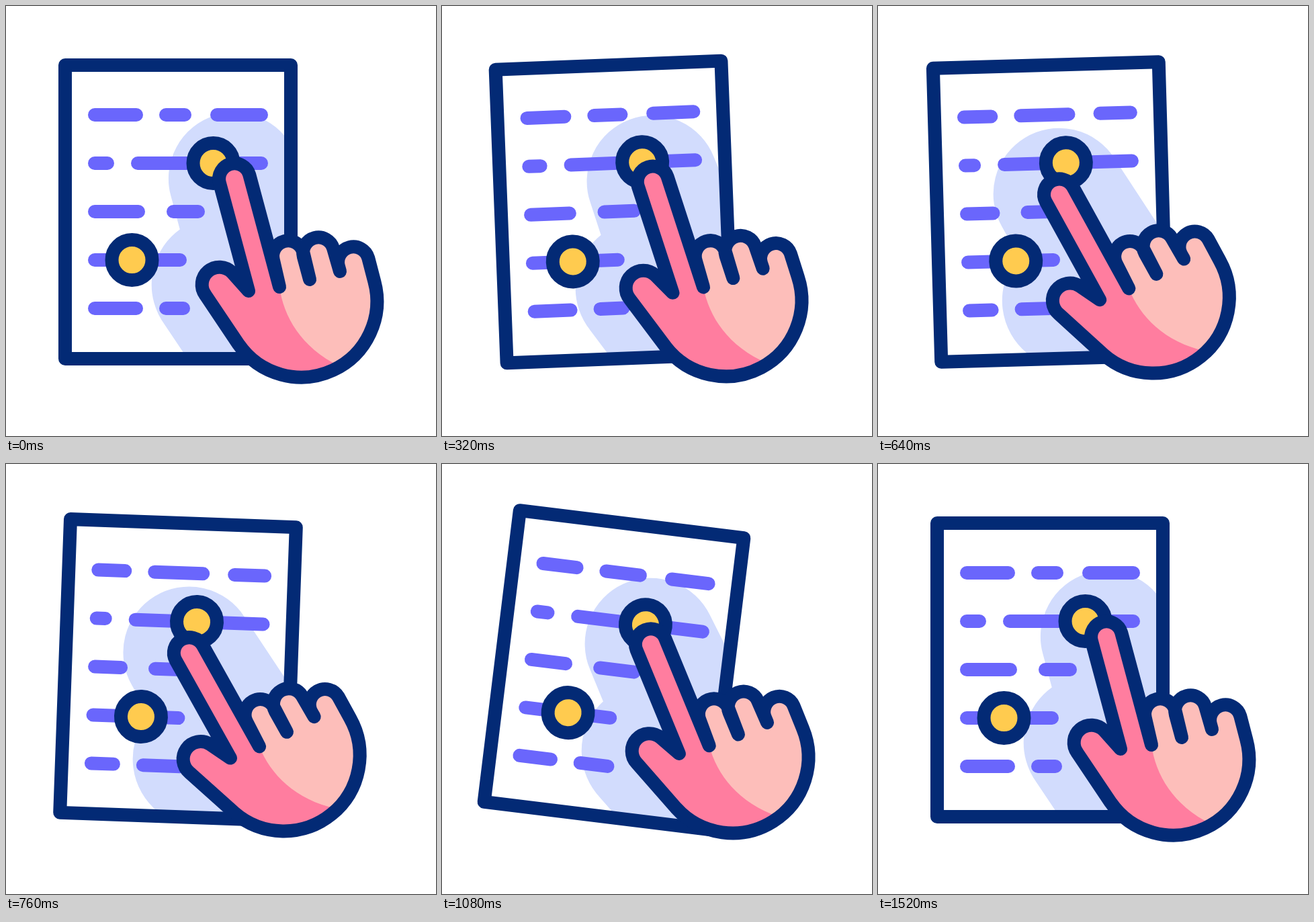
Recreate the animation shown at these times as an HTML page with a canvas. Size 640 by 640 pixels, loop 2 s.

```html
<!DOCTYPE html>
<html lang="en">
<head>
<meta charset="utf-8">
<title>Hand adjusting a page</title>
<style>
html, body { margin: 0; height: 100%; overflow: hidden; background: #fff; }
canvas { display: block; width: 640px; height: 640px; }
</style>
</head>
<body>
<canvas id="stage" width="640" height="640"></canvas>
<script>
const ctx = document.getElementById('stage').getContext('2d');
const NAVY = '#032a75', VIOLET = '#6a66fc', BLUE = '#d2dcfd';
const PINK = '#ff7d9f', PEACH = '#fdbeba', YELLOW = '#ffcb4f';
const LOOP = 2000, STEP = 40;
const PAGE = { x: 88, y: 88, w: 336, h: 437, cx: 256, cy: 306.5 };
const PALM = { x: 439, y: 439 };

// Hand outline, built from the thumb and index finger plus the folded fingers
const pointing = 'L296.7 430A26 26 0 0 1 336.4 396.6L361 424L317.8 263';
const index = pointing + 'A23 23 0 0 1 362.2 251L407 418';
const folded = 'L397.8 378A23 23 0 0 1 442.2 366L452 407L442.8 373' +
  'A23 23 0 0 1 487.2 361L497 395L494.8 387A23 23 0 0 1 539.2 375L548.3 410';
const hand = new Path2D('M346.3 503.8' + index + folded + 'A113 113 0 0 1 346.3 503.8Z');
const shade = new Path2D('M407 418C413 462 439 508 496 536A113 113 0 0 1 346.3 503.8' + index + 'Z');
const halo = new Path2D('M346.3 503.8' + pointing + 'A23 23 0 0 1 361.7 249.3L428 438Z');

const mix = (a, b, k) => a + (b - a) * k;

// Same curve as CSS ease-in-out
function ease(p) {
  p = Math.min(1, Math.max(0, p));
  let s = p;
  for (let i = 0; i < 6; i++) {
    s -= (s * (1.26 + s * (-0.78 + 0.52 * s)) - p) / (1.26 + s * (-1.56 + 1.56 * s));
  }
  return s * s * (3 - 2 * s);
}

// keys: [time, value] pairs in order
function track(t, keys) {
  const i = keys.findIndex(k => k[0] > t);
  if (i < 0) return keys[keys.length - 1][1];
  if (i === 0) return keys[0][1];
  const [t0, a] = keys[i - 1], [t1, b] = keys[i];
  return mix(a, b, ease((t - t0) / (t1 - t0)));
}

function turn(x, y, degrees) {
  ctx.translate(x, y);
  ctx.rotate(degrees * Math.PI / 180);
  ctx.translate(-x, -y);
}

function layer(draw) {
  ctx.save();
  draw();
  ctx.restore();
}

function paint(path, fill, stroke, width) {
  ctx.fillStyle = fill;
  ctx.fill(path);
  if (!stroke) return;
  ctx.strokeStyle = stroke;
  ctx.lineWidth = width;
  ctx.stroke(path);
}

function dash(y, from, to) {
  ctx.strokeStyle = VIOLET;
  ctx.lineWidth = 20;
  ctx.beginPath();
  ctx.moveTo(from + 10, y);
  ctx.lineTo(to - 10, y);
  ctx.stroke();
}

function knob(x, y) {
  const circle = new Path2D();
  circle.arc(x, y, 30, 0, 7);
  paint(circle, YELLOW, NAVY, 20);
}

function render(t) {
  const tilt = track(t, [[0, 0], [507, -3.1], [1013, 7.24], [1520, 0]]);
  const slide = track(t, [[104, 0], [697, 1], [765, 1], [1411, 0]]);
  const swing = track(t, [[140, 0], [705, 1], [800, 1], [1370, 0]]);
  const shift = track(t, [[70, 0], [540, -30.5], [1345, 0]]);

  const tiltPage = () => turn(PAGE.cx, PAGE.cy, tilt);
  const poseHand = () => {
    ctx.translate(shift, -6 * swing);
    turn(PALM.x, PALM.y, -14.2 * swing);
  };
  const sheet = new Path2D();
  sheet.rect(PAGE.x, PAGE.y, PAGE.w, PAGE.h);

  ctx.fillStyle = '#fff';
  ctx.fillRect(0, 0, 640, 640);
  ctx.lineCap = ctx.lineJoin = 'round';

  layer(() => {
    tiltPage();
    ctx.clip(sheet);
    ctx.resetTransform();
    poseHand();
    paint(halo, BLUE, BLUE, 150);
  });

  layer(() => {
    tiltPage();
    const at = (a, b) => mix(a, b, slide);
    dash(162, 122, at(204, 182));
    dash(162, at(228, 206), at(276, 298));
    dash(162, at(304, 325), 390);
    dash(234, 122, at(161, 155));
    dash(234, at(186, 180), 390);
    dash(306, 122, at(207, 181));
    dash(306, at(239, 212), 296);
    dash(378, 122, 269);
    dash(450, 122, at(204, 175));
    dash(450, at(228, 199), 274);
    paint(sheet, 'transparent', NAVY, 20);
    knob(at(308.5, 281.4), 234);
    knob(at(187.5, 203.5), 378);
  });

  layer(() => {
    poseHand();
    paint(hand, PEACH);
    paint(shade, PINK);
    paint(hand, 'transparent', NAVY, 20);
  });
}

function frame() {
  const t = performance.now() % LOOP;
  render(Math.floor(t / STEP) * STEP);
  requestAnimationFrame(frame);
}
frame();
</script>
</body>
</html>
```
